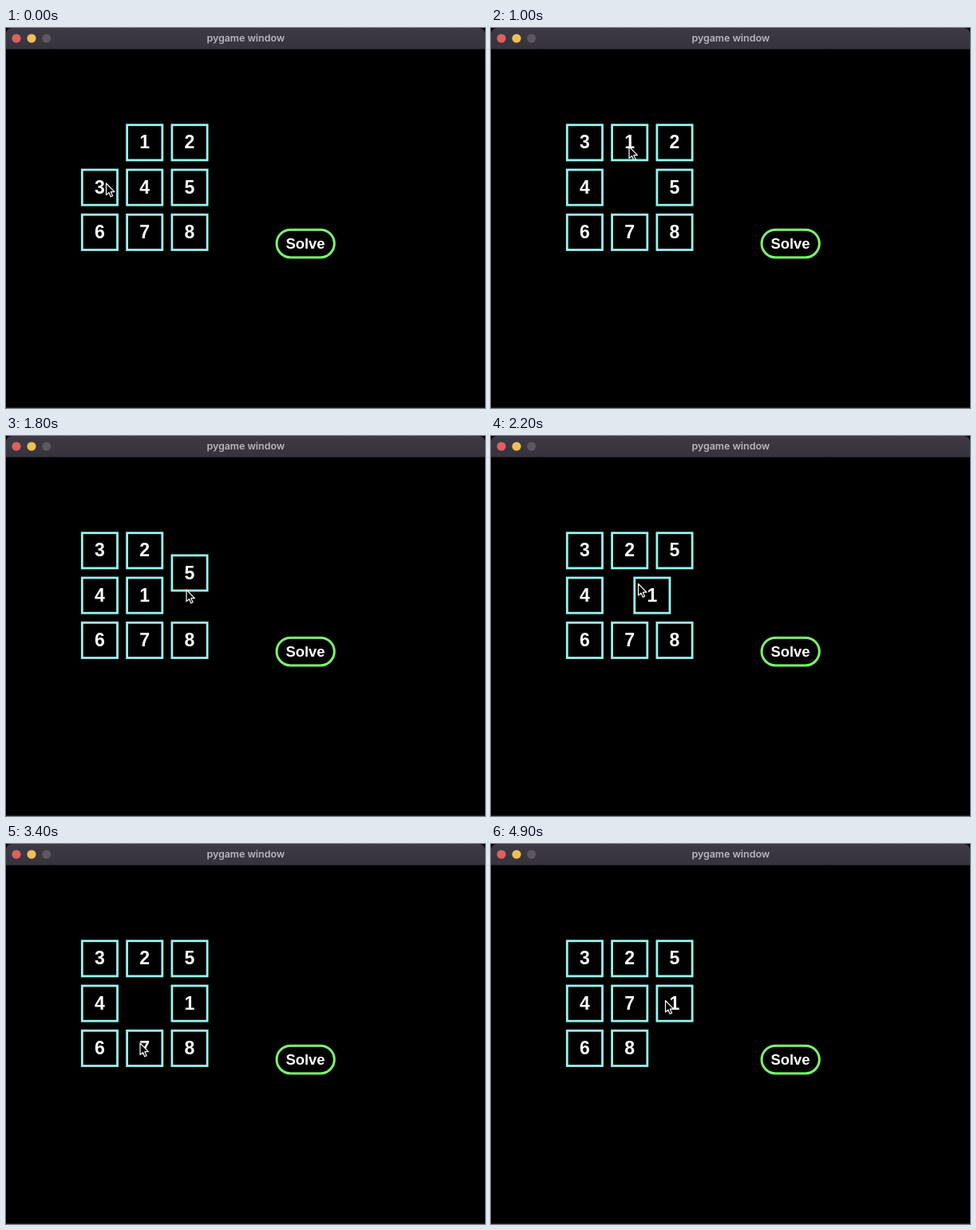
An HTML page for the animation above (5000 ms loop, 600x477 px).

```html
<!DOCTYPE html>
<html lang="en">
<head>
<meta charset="utf-8">
<title>Sliding puzzle</title>
<style>
  html, body { margin: 0; width: 100%; height: 100%; overflow: hidden; background: #000; }
  svg { display: block; width: 600px; height: 477px; }
  text { text-anchor: middle; font-weight: 700; fill: #fff; }

  .title { font: 600 12.4px Inter, sans-serif; fill: #b9b6bc; }
  .tile use { fill: #000; stroke: #98f5ee; stroke-width: 2.8; }
  .tile text { font-size: 23px; font-family: "Liberation Sans", Arial, sans-serif; }
  .button rect { fill: #000; stroke: #7cfb6c; stroke-width: 3; }
  .button text { font-size: 18.4px; font-family: "Liberation Sans", Arial, sans-serif; }
  .cursor path { fill: #000; stroke: #fff; stroke-width: 1.2; stroke-linejoin: round; }

  /* Slides take two 100 ms ticks; one tick is 2% of the loop. */
  .tile, .cursor { --s: 56.3px; animation: 5s steps(2) -20ms infinite; }
  .t1 { animation-name: t1; }
  .t2 { animation-name: t2; }
  .t3 { animation-name: t3; }
  .t4 { animation-name: t4; }
  .t5 { animation-name: t5; }
  .t7 { animation-name: t7; }
  .t8 { animation-name: t8; }
  .cursor { animation-name: point; }

  @keyframes t3 { 0%, 4% { translate: 0 0; } 8%, 100% { translate: 0 calc(-1 * var(--s)); } }
  @keyframes t4 { 0%, 12% { translate: 0 0; } 16%, 100% { translate: calc(-1 * var(--s)) 0; } }
  @keyframes t1 {
    0%, 20% { translate: 0 0; }
    24%, 42% { translate: 0 var(--s); }
    46%, 100% { translate: var(--s) var(--s); }
  }
  @keyframes t2 { 0%, 28% { translate: 0 0; } 32%, 100% { translate: calc(-1 * var(--s)) 0; } }
  @keyframes t5 { 0%, 34% { translate: 0 0; } 38%, 100% { translate: 0 calc(-1 * var(--s)); } }
  @keyframes t7 { 0%, 70% { translate: 0 0; } 74%, 100% { translate: 0 calc(-1 * var(--s)); } }
  @keyframes t8 { 0%, 88% { translate: 0 0; } 92%, 100% { translate: calc(-1 * var(--s)) 0; } }

  @keyframes point {
    0%   { translate: 125.5px 195px; animation-timing-function: steps(3); }
    6%   { translate: 127px 195px; animation-timing-function: steps(3); }
    12%  { translate: 169px 196px; animation-timing-function: steps(1); }
    14%  { translate: 171px 197.5px; animation-timing-function: steps(3); }
    20%  { translate: 173px 149px; animation-timing-function: steps(1); }
    22%  { translate: 175px 147px; animation-timing-function: steps(3); }
    28%  { translate: 224.5px 148px; animation-timing-function: steps(3); }
    34%  { translate: 227px 192px; animation-timing-function: steps(1); }
    36%  { translate: 226px 193px; animation-timing-function: steps(3); }
    42%  { translate: 187px 186px; animation-timing-function: steps(1); }
    44%  { translate: 184.5px 185.5px; animation-timing-function: steps(4); }
    52%, 54% { translate: 185px 187px; animation-timing-function: steps(6); }
    66%  { translate: 169px 249px; animation-timing-function: steps(1); }
    68%, 72% { translate: 168px 250px; animation-timing-function: steps(5); }
    82%  { translate: 255px 243.5px; animation-timing-function: steps(2); }
    86%  { translate: 233px 247px; animation-timing-function: steps(3); }
    92%  { translate: 228px 244px; animation-timing-function: steps(3); }
    98%, 100% { translate: 218.5px 196.5px; }
  }
</style>
</head>
<body>
<svg viewBox="0 0 600 477">
  <defs>
    <linearGradient id="bar" x2="0" y2="1">
      <stop stop-color="#3d3a43"/>
      <stop offset="1" stop-color="#36333c"/>
    </linearGradient>
    <rect id="box" x="-22.1" y="-22.1" width="44.2" height="44.2"/>
  </defs>

  <rect width="600" height="477"/>
  <path d="M0 26.4V8Q0 0 8 0H592Q600 0 600 8V26.4Z" fill="url(#bar)"/>
  <rect y="476" width="600" height="1" fill="#222"/>
  <circle cx="13" cy="13" r="5.6" fill="#e0605e"/>
  <circle cx="32" cy="13" r="5.6" fill="#efbf53"/>
  <circle cx="50.7" cy="13" r="5.6" fill="#5b585f"/>
  <text class="title" x="300.3" y="17.3">pygame window</text>

  <g class="tile t1" transform="translate(173.7 143.8)"><use href="#box"/><text y="7.6">1</text></g>
  <g class="tile t2" transform="translate(230 143.8)"><use href="#box"/><text y="7.6">2</text></g>
  <g class="tile t3" transform="translate(117.4 200.1)"><use href="#box"/><text y="7.6">3</text></g>
  <g class="tile t4" transform="translate(173.7 200.1)"><use href="#box"/><text y="7.6">4</text></g>
  <g class="tile t5" transform="translate(230 200.1)"><use href="#box"/><text y="7.6">5</text></g>
  <g class="tile t6" transform="translate(117.4 256.4)"><use href="#box"/><text y="7.6">6</text></g>
  <g class="tile t7" transform="translate(173.7 256.4)"><use href="#box"/><text y="7.6">7</text></g>
  <g class="tile t8" transform="translate(230 256.4)"><use href="#box"/><text y="7.6">8</text></g>

  <g class="button">
    <rect x="339" y="253.2" width="72.3" height="34.8" rx="17.4"/>
    <text x="375" y="277">Solve</text>
  </g>

  <g class="cursor"><path d="M0 0V14.6L3.4 11.6L5.7 16.8L8.1 15.8L5.8 10.7H10.4Z"/></g>
</svg>
</body>
</html>
```
